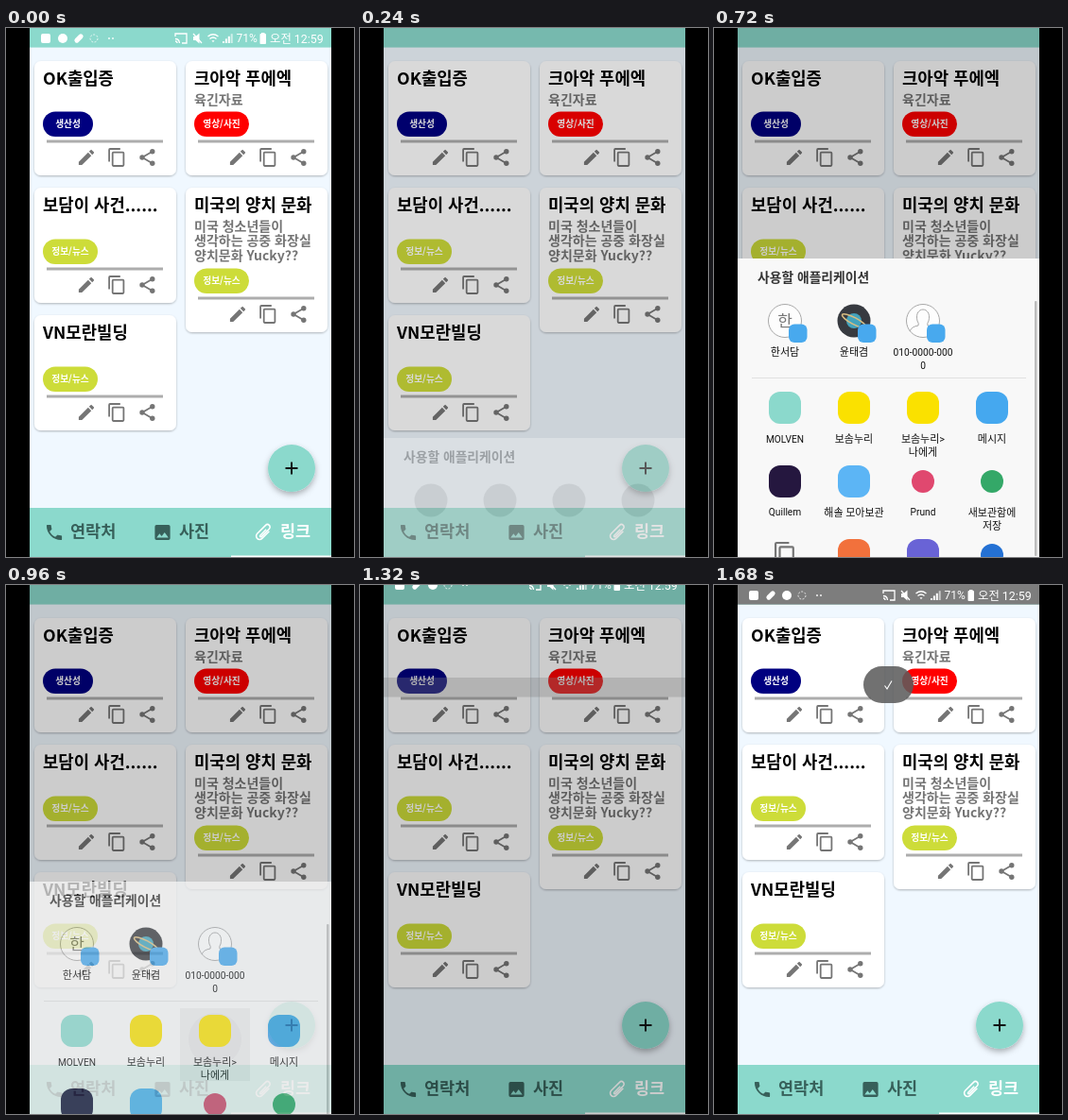
Recreate the animation shown at these times as an HTML page. Size 368 by 560 pixels, loop 1.8 s.

```html
<!DOCTYPE html>
<html lang="ko">
<head>
<meta charset="utf-8">
<style>
  html, body { margin: 0; width: 100%; height: 100%; overflow: hidden; background: #000; }
  svg { display: block; }
  text { font-family: "Noto Sans CJK KR", "Noto Sans CJK", sans-serif; }
  .ui { font-family: Roboto, "Noto Sans CJK KR", "Noto Sans CJK", sans-serif; }
</style>
</head>
<body>
<svg id="stage" width="368" height="560" viewBox="0 0 368 560"></svg>
<script>
const LOOP = 1800, STEP = 120;
const TEAL = '#8bd9cc', GREY = '#757575', LIME = '#cddc39';
const COLUMNS = [75, 148, 221, 294];

const glyphs = {
  edit: '<path d="M3 17.25V21h3.75L17.81 9.94l-3.75-3.75zM20.71 7.04a1 1 0 0 0 0-1.41l-2.34-2.34a1 1 0 0 0-1.41 0l-1.83 1.83 3.75 3.75z"/>',
  copy: '<path fill-rule="evenodd" d="M16 1H4a2 2 0 0 0-2 2v14h2V3h12zM19 5H8a2 2 0 0 0-2 2v14a2 2 0 0 0 2 2h11a2 2 0 0 0 2-2V7a2 2 0 0 0-2-2zM19 21H8V7h11z"/>',
  share: '<path d="M18 5L6 12L18 19" fill="none" stroke="currentColor" stroke-width="2"/><circle cx="18" cy="5" r="3"/><circle cx="6" cy="12" r="3"/><circle cx="18" cy="19" r="3"/>',
  phone: '<path d="M6.6 10.8c1.45 2.8 3.8 5.1 6.6 6.6l2.2-2.2q.45-.45 1-.25 1.7.55 3.6.55 1 0 1 1V20q0 1-1 1C10.6 21 3 13.4 3 4q0-1 1-1h3.5q1 0 1 1 0 1.9.57 3.6.15.55-.25 1z"/>',
  image: '<path fill-rule="evenodd" d="M21 19V5a2 2 0 0 0-2-2H5a2 2 0 0 0-2 2v14a2 2 0 0 0 2 2h14a2 2 0 0 0 2-2zM8.5 13.5l2.5 3 3.5-4.5 4.5 6H5z"/>',
  clip: '<path transform="translate(12 12) rotate(45)" fill="none" stroke="currentColor" stroke-width="1.7" d="M4-6V6a4 4 0 0 1-8 0V-8a3 3 0 0 1 6 0V5a1 1 0 0 1-2 0V-5"/>'
};

const icon = (name, x, y, color = GREY, scale = .9) =>
  `<g transform="translate(${x} ${y}) scale(${scale}) translate(-12 -12)" fill="${color}" color="${color}">${glyphs[name]}</g>`;

const rect = (x, y, w, h, fill, r = 0, extra = '') =>
  `<rect x="${x}" y="${y}" width="${w}" height="${h}" rx="${r}" fill="${fill}" ${extra}/>`;

const circle = (x, y, r, fill, extra = '') =>
  `<circle cx="${x}" cy="${y}" r="${r}" fill="${fill}" ${extra}/>`;

// y is the optical middle of the line
const text = (s, x, y, size, fill, extra = '') =>
  `<text x="${x}" y="${y + size * .37}" font-size="${size}" fill="${fill}" ${extra}>${s}</text>`;

const centred = 'text-anchor="middle"';
const bold = 'font-weight="700"';

function card(x, top, bottom, title, lines, tag, tagColor, tagWidth) {
  const body = lines.map((s, i) => text(s, x + 9, top + 40.5 + i * 15.8, 14, GREY, bold)).join('');
  return rect(x, top, 150, bottom - top, '#fff', 7, 'filter="url(#soft)"')
    + text(title, x + 9, top + 18, 17.8, '#000', bold) + body
    + rect(x + 9, bottom - 67.5, tagWidth, 26.5, tagColor, 13.2)
    + text(tag, x + 9 + tagWidth / 2, bottom - 54.5, 9.7, '#fff', `${centred} ${bold}`)
    + rect(x + 13, bottom - 37.5, 123, 3, '#adadad')
    + ['edit', 'copy', 'share'].map((n, i) => icon(n, x + 55 + i * 32.2, bottom - 19)).join('');
}

function page() {
  const dark = '#37605a';
  return rect(25, 0, 319, 560, '#f0f8ff')
    + card(30, 35, 156, 'OK출입증', [], '생산성', '#000080', 53)
    + card(190, 35, 156, '크아악 푸에엑', ['육긴자료'], '영상/사진', '#ff0000', 58)
    + card(30, 169, 291, '보담이 사건......', [], '정보/뉴스', LIME, 58)
    + card(190, 169, 322, '미국의 양치 문화', ['미국 청소년들이', '생각하는 공중 화장실', '양치문화 Yucky??'], '정보/뉴스', LIME, 58)
    + card(30, 304, 426, 'VN모란빌딩', [], '정보/뉴스', LIME, 58)
    + rect(25, 508, 319, 52, TEAL)
    + icon('phone', 51, 534, dark) + text('연락처', 68, 533, 17.5, dark, bold)
    + icon('image', 165.5, 534, dark) + text('사진', 183, 533, 17.5, dark, bold)
    + icon('clip', 272, 534, '#fff') + text('링크', 290, 533, 17.5, '#fff', bold)
    + rect(238, 558.5, 106, 1.5, '#fff')
    + circle(302, 466, 25, TEAL, 'filter="url(#lift)"')
    + '<path d="M295.5 466h13M302 459.5v13" stroke="#111" stroke-width="2"/>';
}

function status() {
  const bandage = '<rect x="-5.5" y="-2.5" width="11" height="5" rx="2.5" fill="#fff" transform="rotate(-45)"/>';
  const bars = [0, 1, 2, 3].map(i => rect(229 + i * 2.9, 14 - i * 2.6, 2, 2 + i * 2.6, '#fff', 0, i > 2 ? 'opacity=".6"' : '')).join('');
  return rect(37, 6, 10, 10, '#fff', 2)
    + `<g id="ring">${circle(0, 0, 5, '#fff')}</g><g id="bandage">${bandage}</g>`
    + circle(93, 11, 4, 'none', 'stroke="#fff" stroke-dasharray="2 1.5" opacity=".8"')
    + circle(109, 11, .9, '#fff') + circle(113, 11, .9, '#fff')
    + '<g fill="none" stroke="#fff" stroke-width="1.3"><path d="M179 9V6h12v10h-5M179 11.5q4 0 4.5 4.5M179 14q2 0 2 2"/>'
    + '<path d="M198 6l9 10M213.5 9q5.5-4.5 11 0M215.5 11.5q3.5-3 7 0"/></g>'
    + '<path d="M198 9h2.5l4-3.5v11l-4-3.5h-2.5zM217.5 13.3h3l-1.5 2z" fill="#fff"/>' + bars
    + text('71%', 243.5, 11, 12, '#fff', 'class="ui"')
    + rect(268.5, 6, 6.5, 11, '#fff', 1) + rect(270, 5, 3.5, 2, '#fff')
    + text('오전 12:59', 279, 11, 12.4, '#fff', 'class="ui"');
}

function label(lines, x, y) {
  return lines.map((s, i) => text(s, x, y + i * 14, /[가-힣]/.test(s) ? 11 : 10.2, '#111',
    `class="ui" ${centred}`)).join('');
}

function sheet() {
  const tile = (x, y, fill) => rect(x - 17, y - 17, 34, 34, fill, 12);
  const rim = 'stroke="#a8a8a8" stroke-width="1"';
  const avatars = circle(75, 310, 17.5, '#fdfdfd', rim) + text('한', 75, 309.5, 17, '#777', centred)
    + circle(148, 310, 17.5, '#373a40') + circle(148, 310, 8, '#43a4bd')
    + '<ellipse cx="148" cy="310" rx="14" ry="3.5" fill="none" stroke="#d8bd82" stroke-width="1.6" transform="rotate(28 148 310)"/>'
    + circle(221, 310, 17.5, '#fdfdfd', rim)
    + `<path d="M207 321q2-5 9-6q1-2-1-5c-4-16 16-16 12 0q-2 3-1 5q7 1 9 6" fill="none" ${rim}/>`
    + COLUMNS.slice(0, 3).map(x => rect(x + 4, 313.5, 19.5, 19.5, '#48a9ee', 6)).join('');
  const apps = [TEAL, '#fae100', '#fae100', '#45a8ef'].map((c, i) => tile(COLUMNS[i], 402, c)).join('')
    + tile(75, 480, '#25173f') + tile(148, 480, '#5cb5f5')
    + circle(221, 480, 12, '#e0486f') + circle(294, 480, 12, '#34a868')
    + icon('copy', 75, 556, GREY, 1.1) + tile(148, 558, '#f2713c')
    + tile(221, 558, '#6963d6') + circle(294, 558, 12, '#2471d4');
  const names = [
    [['한서담'], 0, 343], [['윤태겸'], 1, 343], [['010-0000-000', '0'], 2, 343],
    [['MOLVEN'], 0, 435], [['보솜누리'], 1, 435], [['보솜누리&gt;', '나에게'], 2, 435], [['메시지'], 3, 435],
    [['Quillem'], 0, 512.5], [['해솔 모아보관'], 1, 512.5], [['Prund'], 2, 512.5], [['새보관함에', '저장'], 3, 512.5]
  ].map(([lines, col, y]) => label(lines, COLUMNS[col], y)).join('');
  return rect(25, 244, 319, 400, '#f8f8f8')
    + text('사용할 애플리케이션', 46, 264, 13.8, '#333', bold)
    + `<g id="blanks">${COLUMNS.map(x => circle(x, 310, 17.5, '#c4c4c4')).join('')}</g>`
    + `<g id="people">${rect(40, 370, 290, 1, '#e0e0e0')}${avatars}${names}${rect(339, 289, 2.5, 270, '#bcbcbc', 1)}</g>`
    + `<g id="press">${rect(184, 378, 74, 77, '#000', 0, 'opacity=".05"')}${circle(221, 411, 28, '#000', 'opacity=".03"')}</g>`
    + `<g id="apps">${apps}</g>`;
}

const stage = document.getElementById('stage');
stage.innerHTML = `
  <defs>
    <filter id="soft" x="-10%" y="-10%" width="120%" height="125%"><feDropShadow dx="0" dy="1" stdDeviation="1.2" flood-opacity=".28"/></filter>
    <filter id="lift" x="-30%" y="-30%" width="160%" height="170%"><feDropShadow dx="0" dy="3" stdDeviation="3" flood-opacity=".3"/></filter>
  </defs>
  ${rect(0, 0, 368, 560, '#000')}
  <svg x="25" width="319" height="560" viewBox="25 0 319 560">
    ${page()}
    ${rect(25, 0, 319, 20.6, TEAL)}
    ${rect(25, 0, 319, 560, '#000', 0, 'id="dim"')}
    ${rect(25, 0, 319, 20.6, '#7d7d7d', 0, 'id="band"')}
    <g id="status">${status()}</g>
    <g id="sheet">${sheet()}</g>
    <g id="hint">${rect(25, 541, 319, 19, '#f3f3f3')}${text('더 많은 앱을 보려면 위로 올리세요', 185, 551, 11.8, '#555', centred)}</g>
    <g id="toast">${rect(158, 86, 53, 39, '#5c5c5c', 19.5, 'opacity=".87"')}
      <path d="M180.5 106.5l2.5 3.5 5-8.5" fill="none" stroke="#fff" stroke-width="1.1"/></g>
  </svg>`;

const el = {};
stage.querySelectorAll('[id]').forEach(node => el[node.id] = node);

// Linear track through [time, value] keys
function track(t, keys) {
  const i = keys.findIndex(k => k[0] > t);
  if (i < 0) return keys[keys.length - 1][1];
  if (!i) return keys[0][1];
  const [t0, a] = keys[i - 1], [t1, b] = keys[i];
  return a + (b - a) * (t - t0) / (t1 - t0);
}

const fade = (node, value) => node.setAttribute('opacity', value);
const show = (node, on) => fade(node, on ? 1 : 0);
const move = (node, x, y) => node.setAttribute('transform', `translate(${x} ${y})`);

function draw(now) {
  const t = Math.floor((now % LOOP) / STEP) * STEP;
  fade(el.dim, track(t, [[0, 0], [120, .05], [240, .15], [360, .2], [1320, .2], [1560, .04], [1680, 0]]));

  move(el.sheet, 0, track(t, [[120, 320], [240, 190], [360, 4], [480, 0], [720, 0], [960, 70], [1080, 190], [1200, 320]]));
  fade(el.sheet, track(t, [[120, 0], [240, .32], [360, .975], [480, 1], [720, 1], [960, .72], [1080, .36], [1200, 0]]));
  show(el.blanks, t < 360);
  show(el.people, t >= 360);
  show(el.apps, t >= 480);
  show(el.press, t >= 960);
  show(el.hint, t === 360);

  move(el.status, 0, track(t, [[0, 0], [120, -11], [240, -24], [1200, -24], [1320, -11], [1440, 0]]));
  const late = t > 600;
  move(el.ring, late ? 77 : 60, 11);
  move(el.bandage, late ? 60 : 77, 11);

  move(el.band, 0, track(t, [[1320, 98], [1440, 14], [1560, 0]]));
  fade(el.band, track(t, [[1200, 0], [1320, .32], [1440, .65], [1560, 1]]));
  show(el.toast, t >= 1680);
}

const start = performance.now();
function tick() {
  draw(performance.now() - start);
  requestAnimationFrame(tick);
}
tick();
</script>
</body>
</html>
```
